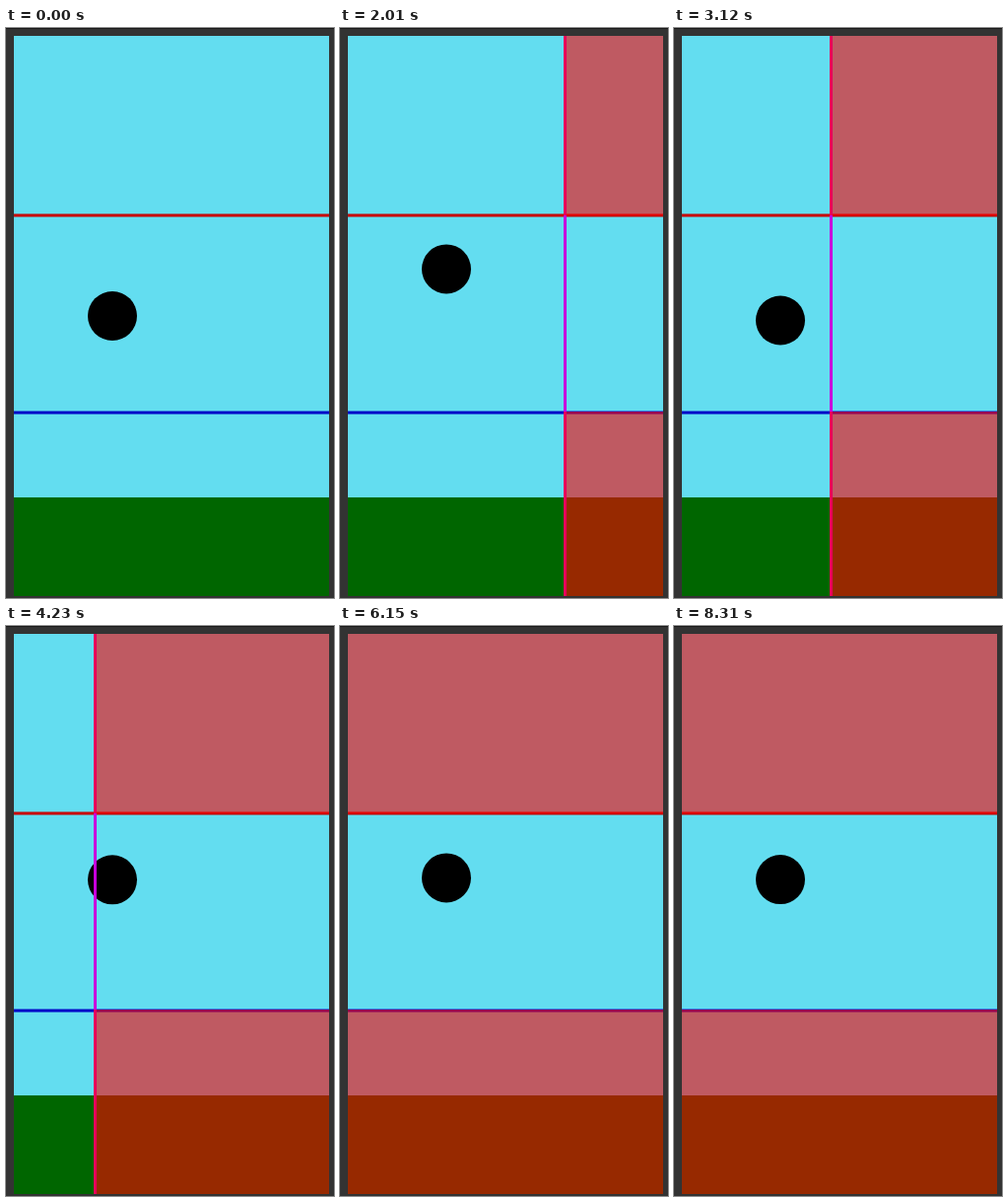
These frames come from a looping animation (333x578 px, 8.34 s). An HTML page with a canvas:

```html
<!DOCTYPE html>
<html lang="en">
<head>
<meta charset="utf-8">
<title>Ball and pipe</title>
<style>
  html, body { margin: 0; width: 100%; height: 100%; overflow: hidden; background: #333; }
  canvas { display: block; }
</style>
</head>
<body>
<canvas id="stage" width="333" height="578"></canvas>
<script>
const ctx = document.getElementById('stage').getContext('2d');
const LOOP = 8340, STEP = 30, START = 390;
const LEFT = 8, TOP = 8, RIGHT = 328, BOTTOM = 576, WIDTH = RIGHT - LEFT;
const GAP_TOP = 190, GAP_BOTTOM = 390, GROUND = 476;
const PIPE_SPEED = 0.06225;     // px per ms
const HALF_GRAVITY = 4.834e-4;  // px per ms²
const HOP = 530;                // usual time between two kicks, ms

// Key kicks [ms, y]; evenly spaced hops fill the time between them
const keys = [
  [START, 292], [680, 333], [1815, 286], [3120, 296.5], [3965, 296],
  [4985, 268], [6395, 285], [7110, 346.5], [7505, 291], [8565, 291]
];

function ballY(t) {
  const i = keys.findIndex(k => k[0] > t);
  const [t0, y0] = keys[i - 1], [t1, y1] = keys[i];
  const hop = (t1 - t0) / Math.round((t1 - t0) / HOP || 1 );
  const s = (t - t0) % hop;
  return y0 + (y1 - y0) * (t - t0) / (t1 - t0) - HALF_GRAVITY * s * (hop - s);
}

function rect(color, x, y, w, h) {
  ctx.fillStyle = color;
  ctx.fillRect(x, y, w, h);
}

function draw(t) {
  const edge = Math.floor(228.4 - (t - 2010) * PIPE_SPEED) - 1;
  const pipeW = Math.max(0, RIGHT - edge);

  rect('#333', 0, 0, 333, 578);
  rect('#1a1a1a', 0, 0, 333, 1);

  ctx.save();
  ctx.beginPath();
  ctx.rect(LEFT, TOP, WIDTH, BOTTOM - TOP);
  ctx.clip();

  rect('#63ddf0', LEFT, TOP, WIDTH, BOTTOM - TOP);
  rect('#006600', LEFT, GROUND, WIDTH, BOTTOM - GROUND);

  ctx.fillStyle = '#000';
  ctx.beginPath();
  ctx.arc(108, ballY(t), 25, 0, Math.PI * 2);
  ctx.fill();

  rect('#c80000', LEFT, GAP_TOP - 1.5, WIDTH, 3);
  rect('#0000c8', LEFT, GAP_BOTTOM - 1.5, WIDTH, 3);
  rect('#c800dc', edge, TOP, 3, BOTTOM - TOP);

  const tint = 'rgba(255,0,0,.593)';
  rect(tint, edge, TOP, pipeW, GAP_TOP - TOP);
  rect(tint, edge, GAP_BOTTOM - 1, pipeW, BOTTOM - GAP_BOTTOM + 1);
  ctx.restore();
}

function frame() {
  const t = performance.now() % LOOP;
  draw(Math.max(START, Math.floor(t / STEP) * STEP));
  requestAnimationFrame(frame);
}
frame();
</script>
</body>
</html>
```
